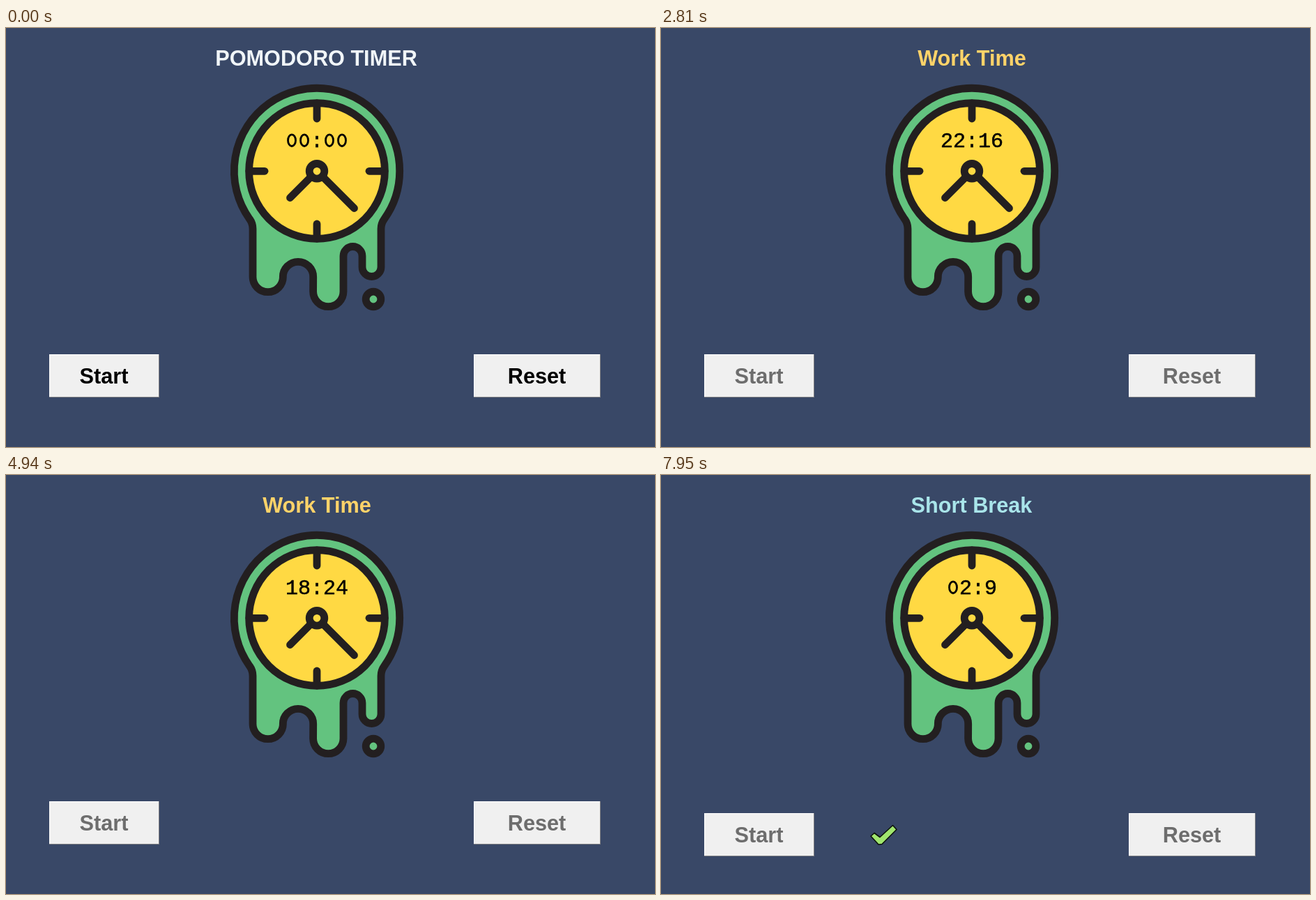
Animation of 931 by 601 pixels, one loop 8000 ms. Source, as an HTML page with a canvas:

```html
<!DOCTYPE html>
<html lang="en">
<head>
<meta charset="utf-8">
<title>Pomodoro timer</title>
<style>
  html, body { margin: 0; width: 931px; height: 601px; overflow: hidden; background: #394867; }
  canvas { display: block; }
</style>
</head>
<body>
<canvas id="stage" width="931" height="601"></canvas>
<script>
const ctx = document.getElementById('stage').getContext('2d');
const LOOP = 8000, TICK = 79;
const INK = '#231f20', GREEN = '#63c37f', YELLOW = '#ffd943', NAVY = '#394867';
const PRESS = 1420, START = 1560, BREAK = 7520;
const TIP_SHOW = 5300;

// [time in ms, seconds left]
const WORK = [[1560, 1500], [2190, 1384], [3520, 1268], [4940, 1104], [5880, 994], [7040, 858], [7520, 802]];
const REST = [[7520, 180], [7950, 129]];
// [time in ms, x, y] of the pointer tip
const POINTER = [[230, 514, 591], [390, 420, 572], [630, 236, 546], [790, 176, 537],
                 [1030, 153, 513], [1180, 151, 513]];

function segment(points, t) {
  let i = 0;
  while (i < points.length - 2 && t >= points[i + 1][0]) i++;
  return [points[i], points[i + 1]];
}

// Position inside a segment, moving in equal jumps of about one tick.
function stepped(a, b, t) {
  const steps = Math.max(1, Math.round((b[0] - a[0]) / TICK));
  const p = Math.floor((t - a[0]) / (b[0] - a[0]) * steps + 1e-6) / steps;
  return Math.min(1, Math.max(0, p));
}

function secondsAt(points, t) {
  const [a, b] = segment(points, t);
  return Math.round(a[1] + (b[1] - a[1]) * stepped(a, b, t));
}

function clockText(t) {
  if (t < START) return '00:00';
  const s = secondsAt(t < BREAK ? WORK : REST, t);
  const rest = s % 60;
  return String(Math.floor(s / 60)).padStart(2, '0') + ':' + (rest || '00');
}

function circle(x, y, r, fill) {
  ctx.beginPath();
  ctx.arc(x, y, r, 0, 2 * Math.PI);
  ctx.fillStyle = fill;
  ctx.fill();
  ctx.stroke();
}

function line(x1, y1, x2, y2) {
  ctx.beginPath();
  ctx.moveTo(x1, y1);
  ctx.lineTo(x2, y2);
  ctx.stroke();
}

function label(text, x, y, color) {
  ctx.font = 'bold 30.67px "Liberation Sans", Arial, sans-serif';
  ctx.textAlign = 'center';
  ctx.fillStyle = color;
  ctx.fillText(text, x, y);
}

function drawSlime() {
  const cx = 446, cy = 205, r = 118.7;
  const side = Math.atan2(69, 96.5);
  ctx.beginPath();
  ctx.arc(cx, cy, r, Math.PI - side, 2 * Math.PI + side);
  ctx.quadraticCurveTo(538, 280.3, 538, 288);
  ctx.lineTo(538, 343);
  ctx.arc(524.5, 343, 13.5, 0, Math.PI);
  ctx.arc(497.5, 327, 13.5, 0, Math.PI, true);
  ctx.lineTo(484, 378);
  ctx.arc(462.3, 378, 21.7, 0, Math.PI);
  ctx.arc(419, 357, 21.7, 0, Math.PI, true);
  ctx.arc(375.7, 357, 21.7, 0, Math.PI);
  ctx.lineTo(354, 288);
  ctx.quadraticCurveTo(354, 280.3, 349.5, 274);
  ctx.closePath();
  ctx.fillStyle = GREEN;
  ctx.fill();
  ctx.stroke();
}

function drawClock() {
  ctx.strokeStyle = INK;
  ctx.lineWidth = 10.8;
  ctx.lineCap = ctx.lineJoin = 'round';
  drawSlime();
  circle(527, 389, 10.8, GREEN);
  circle(446, 205, 97.4, YELLOW);
  line(446, 108, 446, 130);
  line(446, 302, 446, 281);
  line(349, 205.3, 371, 205.3);
  line(543, 205.3, 521, 205.3);
  line(446, 205, 407.5, 243.5);
  line(446, 205, 499.5, 258.5);
  circle(446, 205.3, 10.8, YELLOW);
}

function drawDigits(text) {
  const advance = 18, base = 170.5;
  ctx.font = '30px "Liberation Mono", "Courier New", monospace';
  ctx.textAlign = 'center';
  ctx.fillStyle = ctx.strokeStyle = '#000';
  [...text].forEach((ch, i) => {
    const x = 446 + (i - (text.length - 1) / 2) * advance;
    if (ch === '0') { // plain zero without a centre dot
      ctx.lineWidth = 2.8;
      ctx.beginPath();
      ctx.ellipse(x, base - 9.3, 5.5, 8.3, 0, 0, 2 * Math.PI);
      ctx.stroke();
    } else {
      ctx.lineWidth = 0.5;
      ctx.fillText(ch, x, base);
      ctx.strokeText(ch, x, base);
    }
  });
}

function drawButton(text, x, y, w, color, pressed) {
  const h = 62;
  ctx.fillStyle = pressed ? '#f8f8f8' : '#7b7c80';
  ctx.fillRect(x, y, w, h);
  ctx.fillStyle = pressed ? '#7b7c80' : '#fff';
  ctx.fillRect(x, y, w - 1, h - 1);
  ctx.fillStyle = '#f0f0f0';
  ctx.fillRect(x + 1, y + 1, w - 2, h - 2);
  const shift = pressed ? 1 : 0;
  label(text, x + w / 2 - 0.5 + shift, y + 42 + shift, color);
}

function polygon(points, fill, stroke, width) {
  ctx.beginPath();
  points.forEach(([x, y]) => ctx.lineTo(x, y));
  ctx.closePath();
  ctx.fillStyle = fill;
  ctx.fill();
  ctx.strokeStyle = stroke;
  ctx.lineWidth = width;
  ctx.stroke();
}

function drawCheck() {
  polygon([[301, 518], [306, 513.5], [314, 519.5], [332.5, 502.5], [338, 508.5],
           [317, 529.5], [312, 530]], '#a0e66e', '#0b120b', 1.6);
}

function drawPointer(t) {
  const [a, b] = segment(POINTER, t);
  const p = stepped(a, b, t);
  ctx.save();
  ctx.translate(a[1] + (b[1] - a[1]) * p, a[2] + (b[2] - a[2]) * p);
  polygon([[0.5, 0.5], [0.5, 10], [2.8, 8], [4.4, 11.8], [6, 11], [4.5, 7.4], [7.8, 7.4]],
          '#fff', '#000', 0.8);
  ctx.restore();
}

function drawTooltip() {
  ctx.fillStyle = '#fff';
  ctx.fillRect(873, 594, 36, 7);
  ctx.font = '8px "Liberation Sans", Arial, sans-serif';
  ctx.textAlign = 'left';
  ctx.fillStyle = '#777';
  ctx.fillText('Run List', 876, 605);
}

function draw(t) {
  const running = t >= START, resting = t >= BREAK;
  ctx.fillStyle = NAVY;
  ctx.fillRect(0, 0, 931, 601);

  if (resting) label('Short Break', 445.5, 54, '#a9e5ea');
  else if (running) label('Work Time', 446, 54, '#ffd369');
  else label('POMODORO TIMER', 445, 54, '#f1f6f9');

  drawClock();
  drawDigits(clockText(t));

  const top = resting ? 485 : 468;
  const color = running ? '#6d6d6d' : '#000';
  drawButton('Start', 62, top, 158, color, t >= PRESS && !running);
  drawButton('Reset', 671, top, 182, color, false);

  if (resting) drawCheck();
  if (t >= POINTER[0][0] && !running) drawPointer(t);
  if (t >= TIP_SHOW && !resting) drawTooltip();
}

const origin = performance.now();
function frame() {
  draw((performance.now() - origin) % LOOP);
  requestAnimationFrame(frame);
}
frame();
</script>
</body>
</html>
```
